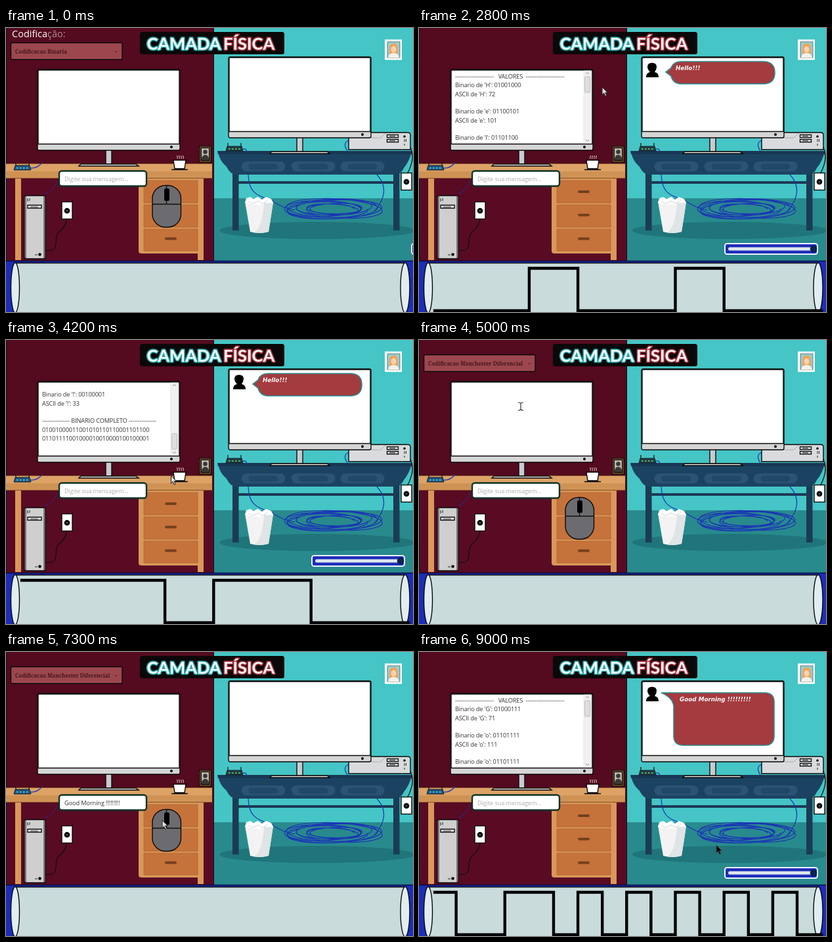
Animation, 620 px wide and 432 px high, one loop 9.1 s. Source, as an HTML page:

```html
<!DOCTYPE html>
<html lang="pt">
<head>
<meta charset="utf-8">
<title>Camada Física</title>
<style>
html, body { margin: 0; width: 100%; height: 100%; overflow: hidden; }
svg { display: block; width: 620px; height: 432px; }
text { font-family: "Open Sans", sans-serif; white-space: pre; }
.ink { stroke: #0a0a0a; stroke-width: 1.4; }
.wire { fill: none; stroke: #1b36b5; stroke-width: 1.2; }
.cord { fill: none; stroke: #111; stroke-width: 1.3; }
.title { font: 700 25.5px Lato, sans-serif; fill: #fff; paint-order: stroke; stroke-width: 3.4; stroke-linejoin: round; }
.option { font: 700 8px "Noto Serif", serif; fill: #47161c; }
.value { font-size: 9.2px; letter-spacing: -.15px; fill: #333; }
.chat { font: italic 700 8.8px "DejaVu Sans", sans-serif; fill: #fff; }
</style>
</head>
<body>
<svg viewBox="0 0 620 432">
  <defs>
    <clipPath id="screen"><rect x="50" y="65" width="200" height="110"/></clipPath>
    <clipPath id="combo"><rect x="8" y="22" width="160" height="26"/></clipPath>
    <g id="outlet"><rect class="ink" width="16" height="26" fill="#fff"/><circle cx="8" cy="13.5" r="4.3"/><circle cx="8" cy="13.5" r="1.4" fill="#555"/></g>
    <g id="monitor">
      <path class="ink" d="M104 122h9v22h-9z" fill="#c9cccf"/>
      <path class="ink" d="M66 144h84l4 3H63z" fill="#e4e4e4"/>
      <rect class="ink" width="217" height="123" rx="2.5" fill="#d6d6d6"/>
      <path class="ink" d="M1 1H216V113.500H1z" fill="#fff" stroke-width="1"/>
      <circle cx="204" cy="118" r="2"/>
    </g>
    <g id="router">
      <path d="M3 0v6M23 0v6" stroke="#222" stroke-width="1.4"/>
      <path d="M2 5h22l2 7H0z" stroke="#14202a"/>
      <path d="M4 9h18" stroke-width="2" stroke-dasharray="2.5 2.5"/>
    </g>
  </defs>

  <!-- walls and floor -->
  <path d="M0 0h317v354H0z" fill="#540a1f"/>
  <path d="M0 228h317v126H0z" fill="#590b24"/>
  <path d="M317 0h303v260H317z" fill="#45c5c5"/>
  <path d="M317 259h303v95H317z" fill="#288a8d"/>
  <ellipse cx="474" cy="308" rx="149" ry="13" fill="#1f7579"/>
  <path d="M316.500 0V354M.5 0V354" stroke="#111"/>

  <!-- left desk -->
  <path d="M14 228h9v125h-9zM202 228h99v125h-9v-10h-86q-4 0-4-4z" fill="#d9985a"/>
  <path d="M0 206h314v23H0z" fill="#cf9255"/>
  <path d="M0 206h314v12H0z" fill="#dda265"/>
  <path d="M0 206.500H314M0 228.500H314" stroke="#6f3f20" stroke-width=".8"/>
  <path d="M210 232h82v34h-82zM210 269h82v34h-82zM210 306h82v33h-82z" fill="#c6723b" stroke="#b0622f" stroke-width=".8"/>
  <path d="M244 249h14M244 284.500h14M244 320.500h14" stroke="#74401f" stroke-width="4" stroke-linecap="round"/>

  <!-- tower and cables -->
  <rect class="ink" x="28" y="255" width="32" height="96" rx="2" fill="#cfcfcf"/>
  <path d="M29 256h2v94h-2zM57 256h2v94h-2z" fill="#777"/>
  <path class="ink" d="M33 269.500h21v4.500H33z" fill="#fff" stroke-width=".9"/>
  <path d="M33 259v5M36 259v4M37 272h12M44 345h4" stroke="#222"/>
  <circle cx="51.500" cy="344.500" r="2.3"/>
  <path class="cord" d="M60 338C83 341 73 323 78 314S94 306 93 280"/>
  <use href="#outlet" x="85" y="264.500"/>
  <path class="wire" d="M37 213Q47 214 55 205"/>
  <path class="wire" d="M60 252Q72 249 77 233" stroke-dasharray="4 2" opacity=".7"/>
  <use href="#router" x="12" y="204" fill="#1d5980" stroke="#58b4cf"/>

  <use href="#monitor" x="48" y="63"/>

  <!-- cup and portrait -->
  <path class="ink" d="M255 201h19l-2 13h-15zM252 215.500h25" fill="#fff"/>
  <path id="steam" fill="none" stroke="#f0cfc8" stroke-width="1"/>
  <path d="M294 179h19v26h-19z" fill="#17120f"/>
  <path d="M296 181h15v22h-15z" fill="none" stroke="#a06b37"/>
  <path d="M298 183h11v18h-11z" fill="#b9b4ac"/>
  <circle cx="303.500" cy="188.500" r="3.2" fill="#393735"/>
  <path d="M298 201q0-8 5.500-8t5.500 8z" fill="#393735"/>

  <!-- right desk -->
  <path d="M345 220h9.500v88H345zM590 220h9.500v88H590zM350 233h245v4H350z" fill="#1b3b55"/>
  <path d="M323 188H618Q615 202 606 213Q602 223 592 223H350Q341 222 336 211Q325 202 323 188z" fill="#1b4361"/>
  <path d="M322 187h296v5H323z" fill="#173753"/>
  <path d="M366 210.500h52M442 210.500h52M517 210.500h52" stroke="#2a5375" stroke-width="15" stroke-linecap="round"/>
  <path d="M374 211h36M450 211h36M525 211h36" stroke="#224868" stroke-width="9" stroke-linecap="round"/>

  <!-- server -->
  <path class="wire" d="M522 171Q512 175 520 187"/>
  <path class="ink" d="M528 159h84q4 0 4 4v22h-94v-19z" fill="#d9dbdd"/>
  <path d="M523 167h48l7-7" fill="none" stroke="#aaa"/>
  <path class="ink" d="M580.500 162.500h17v4h-17zM580.500 169.500h17v4h-17z" fill="#fff" stroke-width=".9"/>
  <path d="M584 164.500h9M584 171.500h9M607 169v4M609.500 169v4M607 176v3" stroke="#222"/>
  <circle cx="607" cy="165" r="1.8"/>
  <path class="cord" d="M616 181Q624 199 611 222"/>
  <use href="#outlet" x="602" y="220.500"/>
  <path class="wire" d="M361 184Q366 183 367 188"/>
  <use href="#router" x="335" y="175" fill="#263b43" stroke="#45b870"/>
  <use href="#monitor" x="339" y="44"/>

  <path class="wire" d="M369 223C370 257 390 255 405 263S425 275 440 277M565 223C580 239 579 258 561 279"/>
  <path class="wire" id="tangle"/>

  <!-- bin -->
  <path d="M364 264h43l-7 46q-14 4-28 0z" fill="#f3f3f3"/>
  <path d="M364 266l2-7 6-2 5 3 7-3 6 4 6-4 8 3 3 6q-20 6-43 0z" fill="#fff"/>
  <path d="M393 266h14l-7 44q-12 3-21 1 12-10 14-45z" fill="#dfe4e6"/>
  <path d="M369 264l7 3 8-4 7 4 8-5" fill="none" stroke="#d0d6d8"/>

  <!-- framed drawing -->
  <path d="M577 17.500h26v31h-26z" fill="#fff"/>
  <path d="M581 21h19v24h-19z" fill="#8fd4d8" stroke="#444" stroke-width=".7"/>
  <path d="M584 40V30q1-7 6.500-7t6.500 7v10z" fill="#eea45c"/>
  <path d="M582 45q1-7 8.500-7t8.500 7z" fill="#f5f1ea"/>
  <ellipse cx="590.500" cy="32.500" rx="4" ry="5" fill="#f8d2b2"/>

  <!-- title -->
  <rect x="204" y="6" width="220" height="34" rx="3.500" fill="#0b0809"/>
  <text class="title" x="214.500" y="33" stroke="#2ba9ad">CAMADA</text>
  <text class="title" x="331" y="33" stroke="#a52f3b">FÍSICA</text>

  <!-- tube -->
  <path d="M0 354h620v78H0z" fill="#1c2db8"/>
  <path d="M0 354.500h620" stroke="#080d3c" stroke-width="1.5"/>
  <path class="ink" d="M14 357.500H608V440H14z" fill="#c9dbdb"/>
  <ellipse class="ink" cx="14" cy="395" rx="6.500" ry="38" fill="#e1edef"/>
  <ellipse class="ink" cx="608" cy="395" rx="7" ry="38" fill="#e1edef"/>
  <path id="signal" fill="none" stroke="#000" stroke-width="4.4" stroke-linecap="square"/>

  <!-- controls -->
  <text id="label" x="9" y="14" font-size="14.5" fill="#fff">Codifica<tspan fill="#ad8b93">ção:</tspan></text>
  <g id="setup">
    <rect class="ink" x="7.500" y="22.500" width="169.500" height="25.500" rx="2" fill="#9c474e"/>
    <text class="option" id="choice" x="14" y="38.500" clip-path="url(#combo)"></text>
    <path d="M166 35l2 2 2-2" fill="none" stroke="#47161c"/>
    <g id="list">
      <path class="ink" d="M7.500 48h169.500v52H7.500z" fill="#b5656b"/>
      <text class="option" x="14" y="60">Codificacao Binaria</text>
      <text class="option" x="14" y="77">Codificacao Manchester</text>
      <text class="option" x="14" y="94">Codificacao Manchester Diferencial</text>
    </g>
    <rect class="ink" x="223" y="239.500" width="43.500" height="63.500" rx="20" fill="#6c6c70"/>
    <path class="cord" d="M223 268h43.500M244.500 240v28"/>
    <rect x="241" y="244" width="8" height="19" rx="2.500"/>
  </g>
  <rect x="81" y="217.500" width="133" height="23" rx="4" fill="#fff" stroke="#0d3328" stroke-width="2.4"/>
  <text id="entry" x="89" y="233" font-size="9.2" letter-spacing="-.1"></text>

  <!-- results -->
  <g id="result">
    <g clip-path="url(#screen)"><g id="values"></g></g>
    <path d="M251 65h11v110h-11z" fill="#f1f1f1" stroke="#ddd" stroke-width=".7"/>
    <path d="M254 70l2.500-2.500 2.500 2.500M254 170l2.500 2.500 2.500-2.500" fill="none" stroke="#888"/>
    <rect id="thumb" x="252.500" y="74" width="8" height="24" rx="1" fill="#dedede" stroke="#b9b9b9" stroke-width=".8"/>
    <path d="M346 75q0-7 6-8-4-4-4-8 0-6 7-6t7 6q0 4-3 8 6 1 6 8z"/>
    <path id="bubble" fill="#a43b3f" stroke="#2b8a8e" stroke-width="1.6"/>
    <text id="chat" class="chat"></text>
  </g>
  <g id="slider">
    <rect x="466" y="328" width="141" height="16" rx="3.500" fill="#1c2eb8" stroke="#eef3fb" stroke-width="2"/>
    <rect x="471" y="333.500" width="131" height="5" rx="2.500" fill="#dfe6ee"/>
    <circle id="knob" cy="336" r="4.800" fill="#0c2356" stroke="#08132f"/>
  </g>

  <path id="arrow" d="M0 0v11.500l2.700-2.400 2 4.500 2-1-2-4.300h3.600z" stroke-width="1"/>
  <path id="beam" d="M-4-6q4 0 4 2 0-2 4-2M0-4v9M-4 6q4 0 4-2 0 2 4 2" fill="none" stroke="#333" stroke-width="1.2"/>
</svg>
<script>
const LOOP = 9100;
const $ = id => document.getElementById(id);
const show = (id, on) => $(id).setAttribute('visibility', on ? 'inherit' : 'hidden');
const set = (id, name, value) => $(id).setAttribute(name, value);
const clamp = v => Math.max(0, Math.min(1, v));
const move = (id, x, y) => set(id, 'transform', `translate(${x} ${y})`);

// Interpolates rows of [time, ...values].
function track(rows, t) {
  if (t <= rows[0][0]) return rows[0].slice(1);
  const i = rows.findIndex(row => row[0] > t);
  if (i < 0) return rows[rows.length - 1].slice(1);
  const a = rows[i - 1], b = rows[i], k = (t - a[0]) / (b[0] - a[0]);
  return a.slice(1).map((v, j) => v + (b[j + 1] - v) * k);
}

const binary = c => c.charCodeAt(0).toString(2).padStart(8, '0');

function message(text, extra) {
  const bits = [...text].map(binary).join('');
  const lines = ['-'.repeat(21) + '   VALORES  ' + '-'.repeat(21)];
  for (const c of text)
    lines.push(`Binario de '${c}': ${binary(c)}`, `ASCII de '${c}': ${c.charCodeAt(0)}`, '');
  lines.push('-'.repeat(15) + ' BINARIO COMPLETO ' + '-'.repeat(15), ...bits.match(/.{1,32}/g));
  return { text, seq: '0' + bits, lines, ...extra };
}

const hello = message('Hello!!!', {
  type: [400, 1200], send: 1600, end: 4500, chatAt: [391, 63.5],
  sent: [[1700, 1], [2800, 8], [3500, 24], [4500, 48]],
  bubble: 'M384 61Q387 51 400 51H526Q542 52 542 68T526 85H400Q387 85 384 73L376 67Z'
});
const morning = message('Good Morning !!!!!!!!!', {
  type: [5900, 6900], send: 7400, end: LOOP, chatAt: [397, 75], manchester: true,
  sent: [[7500, 1], [9000, 44]],
  bubble: 'M369 62H528Q541 63 541 76V129Q540 142 527 142H402Q388 141 388 128V82Q386 69 369 62Z'
});

const cursor = [
  [200, 150, 229], [1200, 150, 229], [1500, 241, 256], [1800, 241, 256],
  [2100, 537, 333], [2400, 601, 333], [2800, 279, 90], [3000, 258, 85],
  [3500, 262, 146], [3800, 262, 157], [4000, 262, 157], [4400, 241, 256],
  [4600, 166, 34], [4800, 100, 90], [5000, 155, 101], [5600, 150, 229],
  [6800, 150, 229], [7000, 238, 256], [7500, 238, 256], [8200, 420, 320], [9000, 453, 294]
];
const scroll = [[3000, 0], [3500, 238], [3800, 284]];

function signalPath(msg, n) {
  const HIGH = 365.5, LOW = 430, STEP = 74.2;
  let d = '';
  for (let j = 0; j < Math.min(n, 8); j++) {
    const one = msg.seq[n - 1 - j] === '1';
    const x = 19.5 + STEP * j, mid = x + STEP / 2, end = x + STEP;
    const a = msg.manchester === one ? LOW : HIGH;
    const first = msg.manchester ? a : one ? HIGH : LOW;
    const last = msg.manchester ? HIGH + LOW - a : first;
    d += `${j ? 'L' : 'M'}${j ? x : 24} ${first}H${mid}V${last}H${end}`;
  }
  return d;
}

let listed;
function listValues(msg) {
  if (listed === msg) return;
  listed = msg;
  $('values').innerHTML = msg.lines
    .map((line, i) => `<text class="value" x="55" y="${77 + i * 13.33}">${line}</text>`).join('');
}

function drawTangle() {
  let d = '';
  for (let i = 0; i <= 320; i++) {
    const a = i / 320 * Math.PI * 18, r = 0.72 + 0.26 * Math.sin(a * 0.31);
    const x = 496 + 76 * r * Math.cos(a) + 5 * Math.sin(a * 0.17);
    const y = 275 + 16 * r * Math.sin(a + 0.25 * Math.sin(a * 0.23));
    d += `${i ? 'L' : 'M'}${x.toFixed(1)} ${y.toFixed(1)}`;
  }
  set('tangle', 'd', d);
}

function draw(t) {
  const msg = t < hello.end ? hello : morning;
  const sending = t >= msg.send;
  const typed = sending ? '' : msg.text.slice(0,
    Math.floor(clamp((t - msg.type[0]) / (msg.type[1] - msg.type[0])) * msg.text.length));

  show('label', t < hello.send);
  show('setup', !sending);
  show('list', t >= 4600 && t < 4800);
  $('choice').textContent = t < 4800 ? 'Codificacao Binaria' : 'Codificacao Manchester Diferencial';
  $('entry').textContent = typed || 'Digite sua mensagem...';
  set('entry', 'fill', typed ? '#333' : '#adadad');

  show('result', sending);
  listValues(msg);
  const [offset] = msg === hello ? track(scroll, t) : [0];
  move('values', 0, -offset);
  move('thumb', 0, offset * 0.24);
  set('bubble', 'd', msg.bubble);
  set('chat', 'x', msg.chatAt[0]);
  set('chat', 'y', msg.chatAt[1]);
  $('chat').textContent = msg.text;

  const sent = t < msg.sent[0][0] ? 0 : Math.floor(track(msg.sent, t)[0] + 1e-6);
  set('signal', 'd', signalPath(msg, sent));

  const slide = sending ? clamp((t - msg.send) / 200) : 1 - clamp((t - hello.end + 100) / 200);
  const shift = sending || t >= hello.end ? 160 * (1 - slide) : t < 100 ? 152 : 160;
  move('slider', shift, 0);
  set('knob', 'cx', track([[2100, 537], [2400, 601]], t)[0]);

  const [x, y] = track(cursor, t);
  const beam = t < 1300 || (t > 4900 && t < 6900);
  show('arrow', t >= 200 && !beam);
  show('beam', t >= 200 && beam);
  move('arrow', x, y);
  move('beam', x, y);
  const dark = t < 2000 || t > 8000;
  set('arrow', 'fill', dark ? '#080808' : '#ddd');
  set('arrow', 'stroke', dark ? '#444' : '#222');

  const sway = t / 300 % 2 < 1 ? 1 : -1;
  set('steam', 'd', [261, 264, 267, 270].map(s => `M${s} 199q${sway}-2 0-3t0-2`).join(''));
}

function frame(now) {
  draw(Math.floor(now % LOOP / 100) * 100);
  requestAnimationFrame(frame);
}
drawTangle();
draw(0);
requestAnimationFrame(frame);
</script>
</body>
</html>
```
